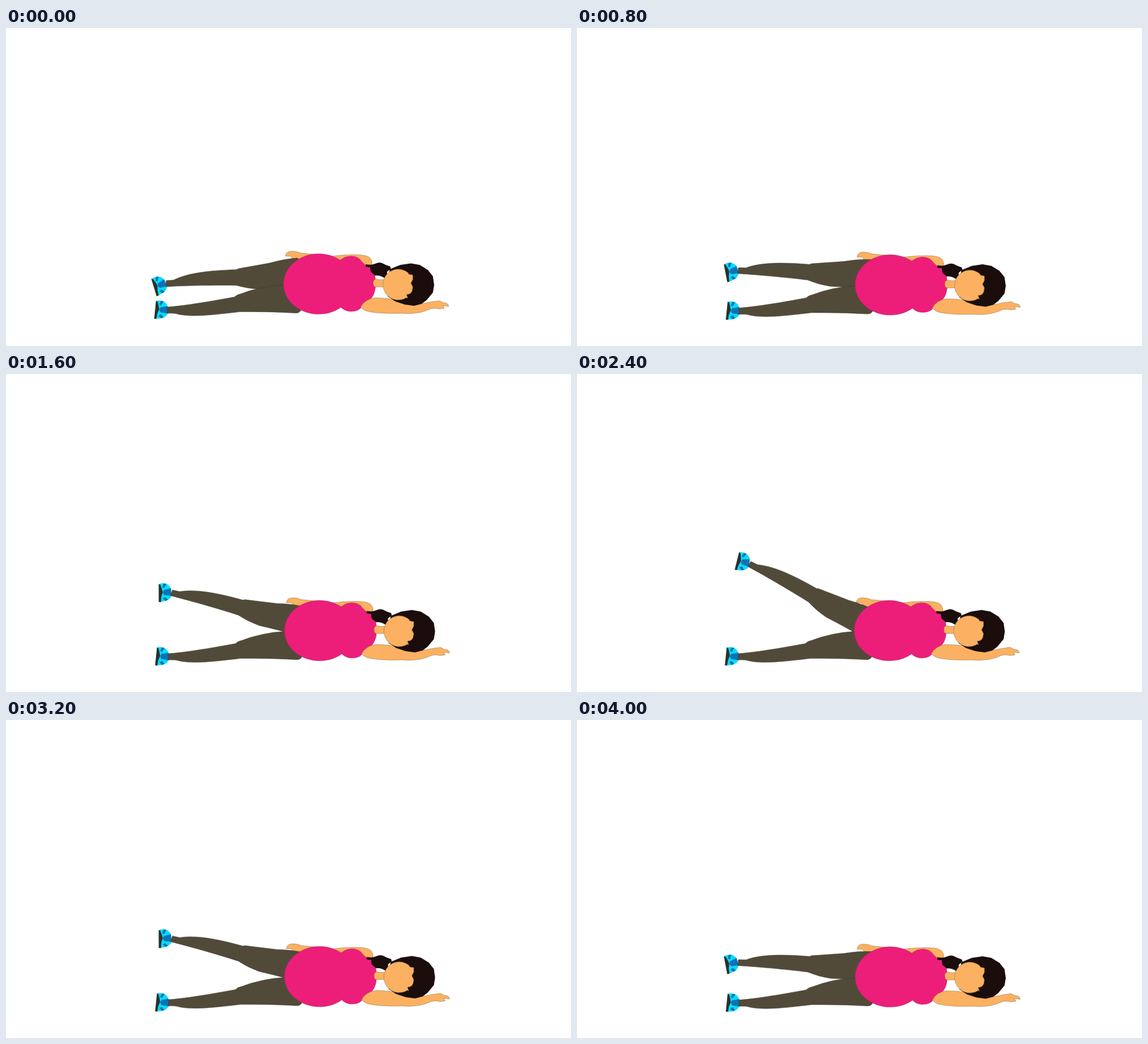
These frames come from a looping animation (900x506 px, 4.8 s). An HTML page:

```html
<!DOCTYPE html>
<html lang="en">
<head>
<meta charset="utf-8">
<title>Side-lying leg raise</title>
<style>
  html, body { margin: 0; height: 100%; overflow: hidden; background: #fff; }
  svg { display: block; width: 900px; height: 506px; }
  .skin { fill: #fbb161; stroke: #8a6a45; stroke-width: .5; }
  .pants { fill: #524a39; stroke: #3a3427; stroke-width: .5; }
  .top { fill: #ed1e79; stroke: #a3265f; stroke-width: .5; }
  .hair { fill: #1a0d0b; }
</style>
</head>
<body>
<svg viewBox="0 0 900 506">
  <defs>
    <!-- Shoe seen from the side, centred on its own origin -->
    <g id="shoe">
      <path fill="#05dcf8" d="M-8-14.5Q0-16 5-13Q10-9 10.5-5V6Q8 11 3 12.5Q-3 14.5-10 14Z"/>
      <path fill="#0b72b8" d="M-1-4L10.5-6V6L-1 4L-3 0ZM0-14.5L4-13.5L0-7L-3-9ZM-4 9L0 7L4 12L0 13.5Z"/>
      <path fill="#2b302d" d="M-8-14.5L-5.500-13L-4-7L-3-1L-6 6L-7.500 14.5L-11 14Z"/>
    </g>
  </defs>
  <g id="body">
    <path class="skin" d="M445 363Q446 356 453 355.200Q462 354.500 469 358L490 360L520 363Q545 360 564 361Q576 362 580 366Q584 371 583 376L572 384L480 378L462 369Q456 368 453 363Z"/>
    <g id="leg">
      <use href="#shoe" transform="translate(244.500 409.500) rotate(-23)"/>
      <path class="pants" d="M255 402L267 401C290 390 320 386 367 384.500L370 383L420 374Q445 367 464 366L480 380L475 413H449Q425 414 404 415.500Q386 415 367 409.500C330 409 290 410 267 411L255 411.500Z"/>
    </g>
    <use href="#shoe" transform="translate(247 448.500)"/>
    <path class="pants" d="M257 444L268 443C305 439 335 433 364 428Q368 424 374 423Q405 411 442 408.500L480 420L470 449Q467 454 461 453.500Q420 451 372 451.500C335 456 300 460 277 456Q268 453 257 454Z"/>
    <path class="top" d="M533 369Q540 363 549 363Q561 363 566 371Q573 379 581 382Q588 388 588.500 402Q590 420 582 430L568 441Q564 451 549 451Q540 451 533 444L500 430V380Z"/>
    <ellipse class="top" cx="498" cy="407.300" rx="56" ry="48"/>
    <path fill="#ed1e79" d="M530 371L548 364L570 390L562 445L535 445L520 410Z"/>
    <path class="skin" d="M565 444Q571 432 587 429.500Q602 429 620 432L645 438Q662 440 676 436L690 434Q694 435 696 437Q705 437 705 443L696 441.500L698 446L690 447Q680 444 671 449Q655 456 629 454Q590 455 573 450Q567 447 565 444Z"/>
    <path class="hair" d="M573 376Q582 378 588 375Q594 372 599 374L605 377L612 379.500L613 383L607 388Q608 394 603 398Q595 393 588 394L581 388L580 381L573 380Z"/>
    <path class="hair" d="M611 384L628 377L645 374.500L659 377L672 385L680 395L682 409L680 421L670 433L662 439L650 442L635 440L620 435L608 427Z"/>
    <path class="skin" d="M602 400.500Q594 401 589 399.500Q584 401 585 407Q585 412 589 412L603 412Z"/>
    <path class="skin" d="M640 389A24.500 24.500 0 1 0 638 429L640 430L638 424Q645 424 647 418L648 412L645 406L648 400V393L642 392Z"/>
  </g>
</svg>
<script>
  const body = document.getElementById("body");
  const leg = document.getElementById("leg");
  const holdTime = 800;

  // Leg lift in degrees, small sway of the body, and slide of the hip joint
  const rest = { lift: 0, sway: [0, 0], hip: [0, 0] };
  const low = { lift: 6.3, sway: [1, 1.5], hip: [1.2, -0.7] };
  const middle = { lift: 17, sway: [1.5, 1], hip: [3.5, -1.8] };
  const high = { lift: 31.3, sway: [-0.5, 1], hip: [0.3, -1.8] };
  const cycle = [rest, low, middle, high, middle, low];

  function draw() {
    const step = Math.floor(performance.now() / holdTime) % cycle.length;
    const { lift, sway, hip } = cycle[step];
    body.setAttribute("transform", `translate(${sway})`);
    leg.setAttribute("transform", `translate(${hip}) rotate(${lift} 450 390)`);
    requestAnimationFrame(draw);
  }
  draw();
</script>
</body>
</html>
```
